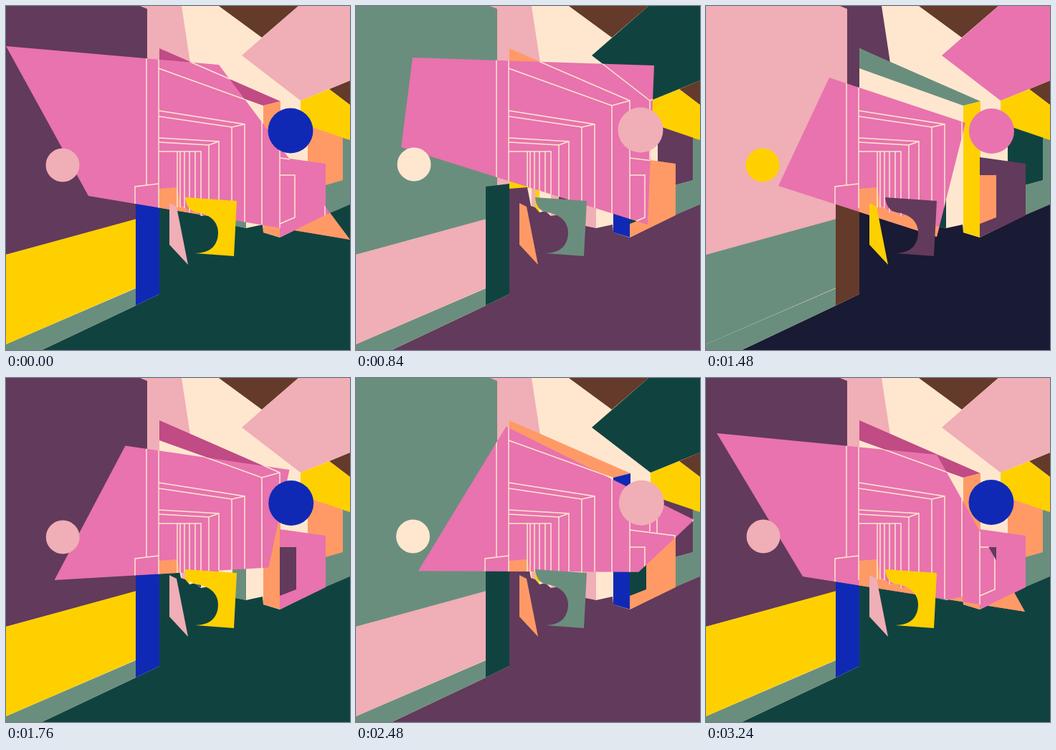
Animation of 480x480 px, one loop 3280 ms. Source, as an HTML page with a canvas:

```html
<!DOCTYPE html>
<html lang="en">
<head>
<meta charset="utf-8">
<title>Colour room</title>
<style>
html, body { margin: 0; width: 100%; height: 100%; overflow: hidden; background: #ffe7cf; }
canvas { display: block; width: 100%; height: 100%; }
</style>
</head>
<body>
<canvas id="stage" width="480" height="480"></canvas>
<script>
const ctx = document.getElementById('stage').getContext('2d');
const LOOP = 3280, STEP = 40;

const plum = '#623a5b', sage = '#6a8e7d', rose = '#f0aeb6', sun = '#ffd000',
  blue = '#1029b5', pine = '#104340', brown = '#643a2a', cream = '#ffe7cf',
  hot = '#e873ae', berry = '#c04b85', orange = '#ff9a66', navy = '#191a33';

const shape = (d, ...colors) => ({ path: new Path2D(d), colors });

const floor = shape('M213 255L239 253L244 279L250 281L256 288L264 286L272 293L283 291L297 300L316 297L316 306L335 310L358 305L359 316L382 323L445 292L480 277V480H50L181 418L214 402Z', pine, plum, navy);

// Each shape carries its colour in the three schemes.
const room = [
  shape('M186 0H245L257 79L214 59V252H196Z', rose, rose, plum),
  shape('M297 0H408L357 44Z', brown),
  shape('M451 116L480 104V138Z', brown),
  shape('M411 132L451 116L480 138V188L420 167L411 165Z', sun),
  shape('M408 0H480V104L411 132L329 69Z', rose, pine, hot),
  shape('M421 167L471 184V243L445 250L421 217Z', orange, plum, pine),
  shape('M470 184L480 187V278L445 293V250L470 243Z', sage),
  // hall, from the far end forward
  shape('M213 203H245V254L213 255Z', orange, sun, orange),
  shape('M245 203H250V281L245 280Z', rose, rose, brown),
  shape('M250 203H257V288L250 282Z', sun, sun, plum),
  shape('M256 203H265V286L256 288Z', cream),
  shape('M264 203H273V293L264 286Z', blue, cream, sun),
  shape('M213 190L283 194V291L272 293V203H213Z', cream, rose, cream),
  shape('M213 184L297 189L283 194L213 190Z', sun, sage, rose),
  shape('M283 194L297 189V300L283 293Z', hot, plum, blue),
  shape('M213 146L334 164L316 168L213 154Z', pine, hot, orange),
  shape('M316 168L335 164V310L316 306Z', sage, rose, pine),
  shape('M214 59L383 133L359 139L214 87Z', berry, orange, sage),
  floor,
  shape('M359 139L383 133V323L359 316Z', orange, blue, sun),
  shape('M382 211L446 220V292L382 323Z', hot, orange, plum),
  shape('M382 236H405V295L382 304Z', plum, pine, orange),
  shape('M0 0H187L197 4V252L181 298L0 347Z', plum, sage, rose),
  shape('M0 472L181 394V418L50 480H0Z', sage),
  shape('M0 347L182 297V393L0 472Z', sun, rose, sage),
  shape('M181 252L214 248V402L181 418Z', blue, pine, brown)
];

const front = [
  shape('M250 267L322 272L318 349L264 345C288 345 296 331 296 316C296 300 283 290 266 288C256 286 251 278 250 267Z', sun, sage, plum),
  shape('M228 275L238 280L254 361L228 333Z', rose, orange, sun)
];

const outline = new Path2D([
  'M196 0V250M213 59V282M0 347L180 298V252L213 248',
  'M213 59L382 132V323M213 87L357 139L382 132M357 139V305',
  'M213 146L333 165V310M213 154L315 169L333 165M315 169V306',
  'M213 184L297 189V300M213 190L283 194L297 189M283 194V293',
  'M213 203H272V293M239 203V281M243 203V281M249 203V282M256 203V288M264 203V286',
  'M297 0L357 44L329 69L410 132L480 104M410 132V214M420 168V216M420 168L480 188',
  'M382 212L445 220V292M382 236H403V295L382 304M445 250L470 243V184'
].join(''));

// time, four corners of the sheet, small disc, large disc
const keys = [
  [0, 0, 56, 297, 82, 480, 326, 115, 265, 79, 222, 397, 174],
  [400, 7, 149, 199, 69, 382, 277, 83, 312, 80, 221, 399.5, 173],
  [840, 79, 72, 416, 83, 407, 305, 63, 197, 81, 221, 397, 173],
  [1480, 172, 100, 362, 163, 322, 322, 101, 251, 79, 222, 398.5, 174.5],
  [2040, 161, 85, 440, 93, 411, 207, 34, 301, 79.5, 222, 397, 174.5],
  [2760, 234, 62, 480, 251, 386, 311, 121, 253, 79.5, 220.5, 399, 174],
  [3240, 15, 77, 322, 107, 445, 326, 135, 277, 80, 221, 398, 173.5]
];
const key = i => keys[(i + keys.length) % keys.length];
const span = i => (key(i + 1)[0] - key(i)[0] + LOOP) % LOOP;
const slope = (i, c) => (key(i + 1)[c] - key(i)[c]) / span(i);

// Tangent without overshoot: harmonic mean of the slopes on both sides.
function tangent(i, c) {
  const a = slope(i - 1, c), b = slope(i, c);
  return a * b > 0 ? 2 * a * b / (a + b) : 0;
}

function pose(t) {
  let i = keys.length - 1;
  while (keys[i][0] > t) i--;
  const h = span(i), u = (t - keys[i][0]) / h, v = 1 - u;
  return keys[i].slice(1).map((p, n) => {
    const c = n + 1;
    return p * v * v * (1 + 2 * u) + key(i + 1)[c] * u * u * (3 - 2 * u)
      + h * u * v * (v * tangent(i, c) - u * tangent(i + 1, c));
  });
}

const scheme = t => t < 480 ? 0 : (1 + Math.floor((t - 480) / 520)) % 3;

function paint(s, n) {
  ctx.fillStyle = s.colors[n] || s.colors[0];
  ctx.fill(s.path);
}

function disc(x, y, r, color) {
  ctx.fillStyle = color;
  ctx.beginPath();
  ctx.arc(x, y, r, 0, Math.PI * 2);
  ctx.fill();
}

function sheet(p) {
  ctx.save();
  ctx.beginPath();
  for (let i = 0; i < 8; i += 2) ctx.lineTo(p[i], p[i + 1]);
  ctx.closePath();
  ctx.clip();
  ctx.fillStyle = hot;
  ctx.fillRect(0, 0, 480, 480);
  ctx.fillStyle = orange;
  ctx.fill(floor.path);
  ctx.strokeStyle = cream;
  ctx.lineWidth = 1.5;
  ctx.stroke(outline);
  ctx.restore();
}

function draw(t) {
  const n = scheme(t), p = pose(t);
  ctx.fillStyle = cream;
  ctx.fillRect(0, 0, 480, 480);
  room.forEach(s => paint(s, n));
  sheet(p);
  front.forEach(s => paint(s, n));
  disc(p[8], p[9], 23.5, [rose, cream, sun][n]);
  disc(p[10], p[11], 31.5, [blue, rose, hot][n]);
}

const start = performance.now();
function tick() {
  const t = (performance.now() - start) % LOOP;
  draw(Math.floor(t / STEP) * STEP);
  requestAnimationFrame(tick);
}
tick();
</script>
</body>
</html>
```
